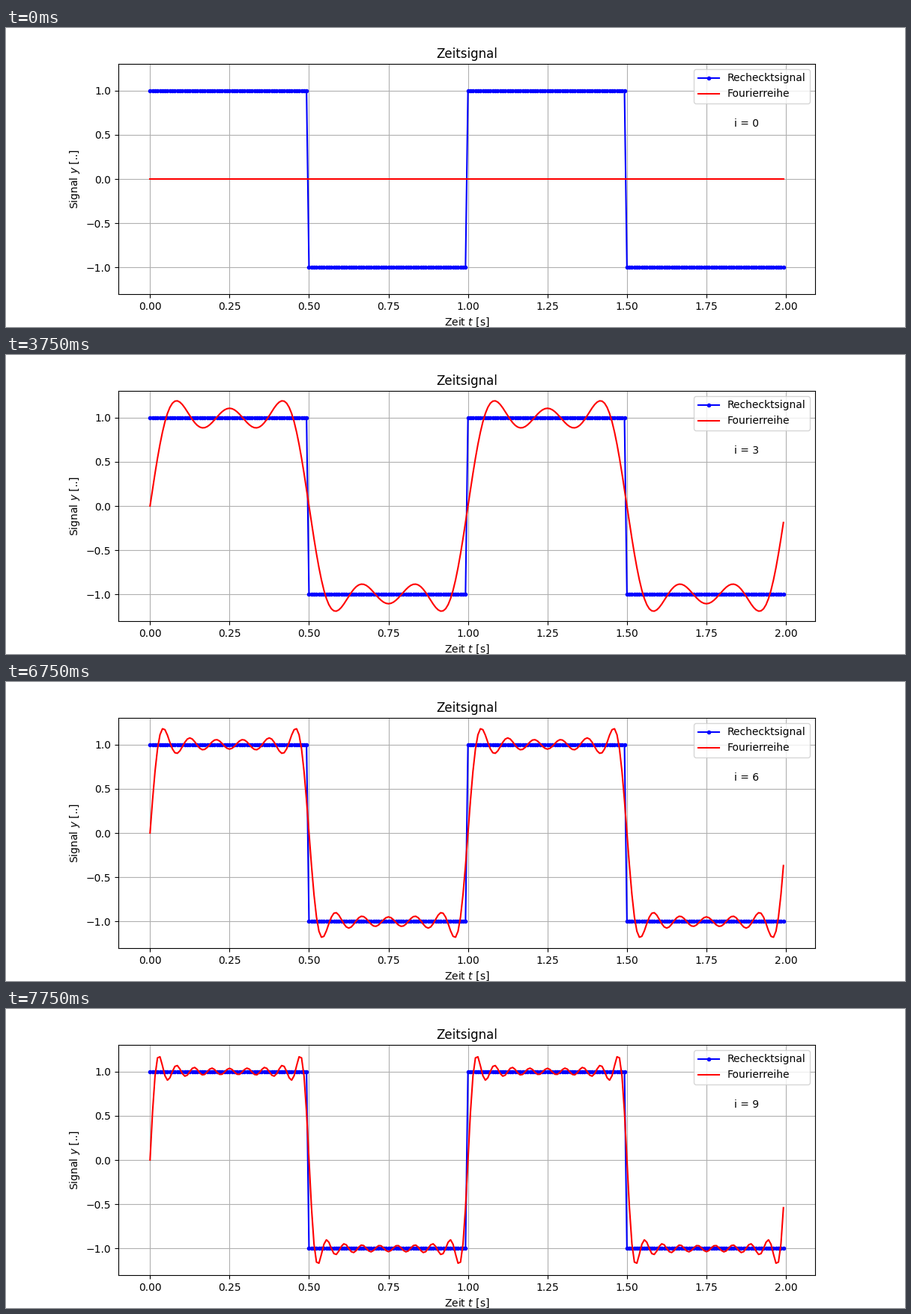
Animation, 1200 px wide and 400 px high, one loop 8 s. Source, as a matplotlib script:

```python
import numpy as np
import matplotlib.pyplot as plt
from matplotlib.animation import FuncAnimation

STEP_MS = 250
LOOP_MS = 8000
# Time at which each further harmonic is added
TERM_STARTS = np.array([500, 2250, 3750, 5000, 6000, 6750, 7250, 7500, 7750])

RATE = 128
samples = np.arange(2 * RATE)
t = samples / RATE
square = np.where(samples % RATE < RATE // 2, 1.0, -1.0)


def fourier(terms):
    y = np.zeros_like(t)
    for n in range(1, 2 * terms, 2):
        y += 4 / np.pi * np.sin(2 * np.pi * n * t) / n
    return y


fig, ax = plt.subplots(figsize=(12, 4), dpi=100)
ax.plot(t, square, "b.-", label="Rechecktsignal")
series, = ax.plot(t, fourier(0), "r-", label="Fourierreihe")
ax.set_ylim(-1.3, 1.3)
ax.set_title("Zeitsignal")
ax.set_xlabel("Zeit $t$ [s]")
ax.set_ylabel("Signal $y$ [..]")
ax.grid(True)
ax.legend(loc="upper right")
counter = fig.text(0.81, 0.67, "i = 0")


def update(frame):
    terms = int(np.sum(TERM_STARTS <= frame * STEP_MS))
    series.set_ydata(fourier(terms))
    counter.set_text(f"i = {terms}")
    return series, counter


anim = FuncAnimation(fig, update, frames=LOOP_MS // STEP_MS,
                     interval=STEP_MS, repeat=True, repeat_delay=0)
plt.show()
```
